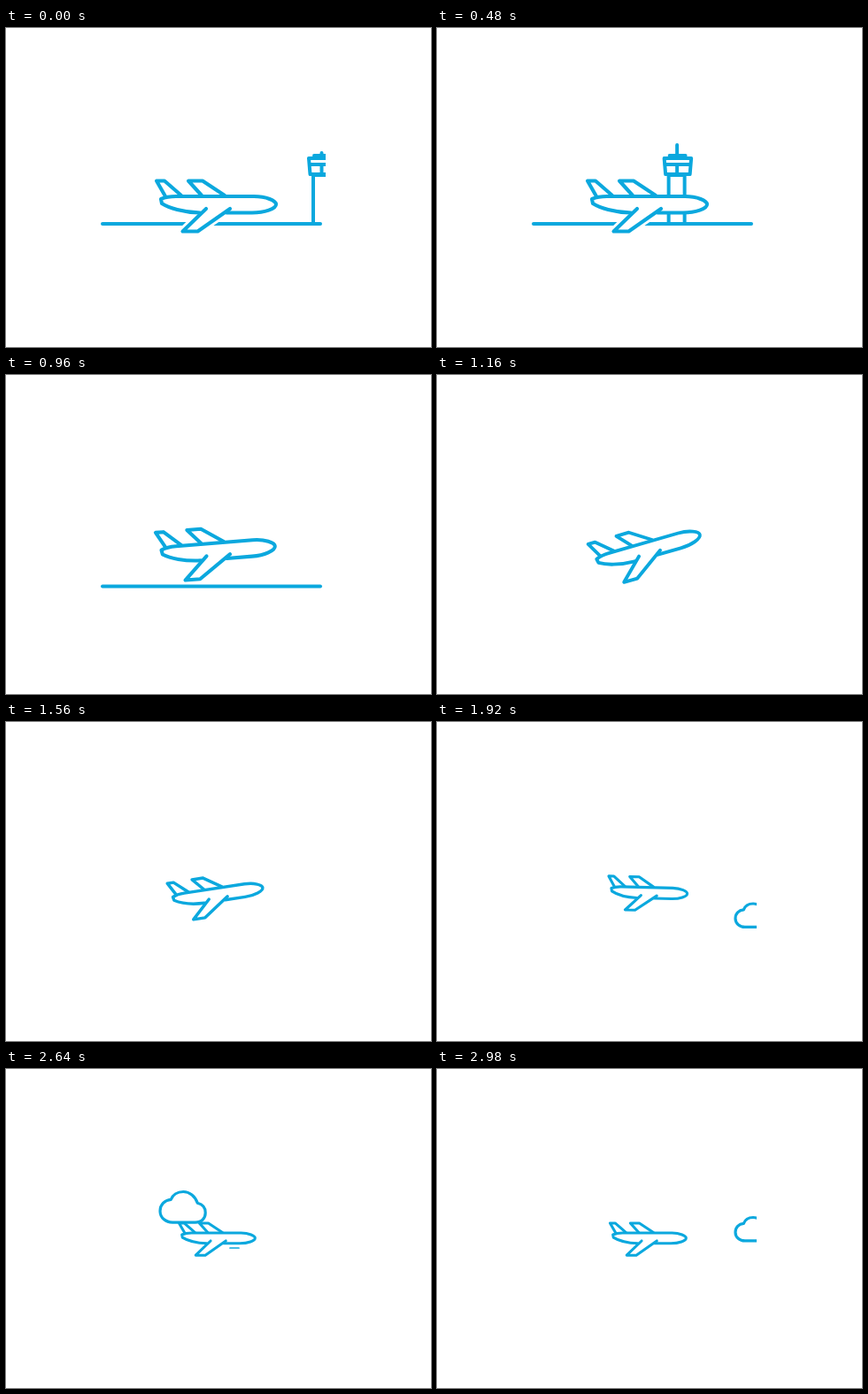
These frames come from a looping animation (480 px wide and 360 px high, 3000 ms). An HTML page:

```html
<!DOCTYPE html>
<html lang="en">
<head>
<meta charset="utf-8">
<title>Take-off</title>
<style>
  html, body { margin: 0; width: 100%; height: 100%; overflow: hidden; background: #fff; }
  svg { display: block; width: 480px; height: 360px; }
  path { vector-effect: non-scaling-stroke; }
  .ink { stroke: #0ba8de; stroke-width: 4; fill: none; stroke-linecap: round; stroke-linejoin: round; }
  .ink .solid { fill: #fff; }
  .ink .halo { stroke: #fff; stroke-width: 10; fill: #fff; }
  .cloud { stroke-width: 3.2; }
  .wind { stroke-width: 1.7; }
</style>
</head>
<body>
<svg viewBox="0 0 480 360">
  <defs>
    <clipPath id="window"><rect x="104" y="120" width="257" height="160"/></clipPath>
    <path id="puff" class="solid" d="M11 27H31C37 27 40 23 40 18.5C40 14 37 11 33 10C31 4 26 0 20.5 0C15 0 11 3 9.5 7C4 7.5 0 11.5 0 17C0 23 5 27 11 27Z"/>
  </defs>
  <g class="ink" clip-path="url(#window)">
    <g id="tower">
      <path class="solid" d="M111 221V166H129V221"/>
      <path class="solid" d="M106 147H136.500L135 165H107.500Z"/>
      <path d="M107 154H135M120.500 154V164M112 144H130"/>
      <path id="mast"/>
    </g>
    <path id="ground" d="M109 221H355"/>
    <g class="cloud">
      <use id="cloud1" href="#puff"/>
      <use id="cloud2" href="#puff"/>
      <use id="cloud3" href="#puff"/>
    </g>
  </g>
  <g id="plane" class="ink">
    <path class="halo" d="M223 207L200 229H217L249 207Z"/>
    <path class="solid" d="M180 190L170 172.500H179L198 189"/>
    <path class="solid" d="M221 189L206 172.500H222L247 189"/>
    <path class="solid" stroke="none" d="M175 193Q182 190 192 190H280C294 190 305 195 305 199C305 204 292 208.500 278 208.500H217C200 208 184 203 176 198Z"/>
    <path d="M219 208.500C200 208 184 203 176 198L175 193Q182 190 192 190H280C294 190 305 195 305 199C305 204 292 208.500 278 208.500H249"/>
    <path class="solid" d="M226 204L199.500 229.500H216.500L253 204"/>
  </g>
  <g class="ink wind">
    <path id="windTop"/>
    <path id="windLow"/>
  </g>
</svg>
<script>
const LOOP = 3000, STEP = 20;
const el = id => document.getElementById(id);

// Each track is a list of [time, value] pairs joined by straight ramps.
function at(track, t) {
  if (t <= track[0][0]) return track[0][1];
  for (let i = 1; i < track.length; i++) {
    const [t0, a] = track[i - 1], [t1, b] = track[i];
    if (t <= t1) return a + (b - a) * (t - t0) / (t1 - t0);
  }
  return track[track.length - 1][1];
}

const tracks = {
  tower: [[310, 236], [780, 0], [880, -50]],
  mast: [[300, 141], [400, 132]],
  ground: [[860, 0], [1100, 42]],
  fade: [[960, 1], [1110, 0]],
  size: [[920, 1], [1160, .92], [1920, .66], [2000, .636]],
  tilt: [[880, 0], [1000, -7], [1160, -16], [1400, -14], [1860, 1.5], [1920, 1.5], [2000, 0]],
  shift: [[920, 240], [1160, 239.3], [1920, 239.7], [2000, 240]],
  rise: [[880, 199], [1160, 196.6], [1920, 192.6], [2000, 190.8]]
};

const clouds = [
  { id: "cloud1", time: 1920, x: 337, y: 205, size: .98, speed: .453 },
  { id: "cloud2", time: 2260, x: 334, y: 138.5, size: 1.28, speed: .421 },
  { id: "cloud3", time: 2980, x: 337, y: 167.5, size: .98, speed: .453 }
];

const place = (id, value) => el(id).setAttribute("transform", value);

// A short streak that slides back while it opens and closes.
function streak(id, t, start, length, from, to, draw) {
  const p = (t - start) / length;
  const live = p > 0 && p < 1;
  el(id).style.display = live ? "" : "none";
  if (live) el(id).setAttribute("d", draw(from + (to - from) * p, 5 * Math.sin(Math.PI * p)));
}

function render(t) {
  const v = {};
  for (const key in tracks) v[key] = at(tracks[key], t);

  place("tower", `translate(${v.tower} 0)`);
  el("mast").setAttribute("d", `M120.5 143V${v.mast}`);
  el("tower").style.display = t < 870 ? "" : "none";

  place("ground", `translate(0 ${v.ground})`);
  el("ground").style.opacity = v.fade;

  place("plane", `translate(${v.shift} ${v.rise}) rotate(${v.tilt}) scale(${v.size}) translate(-240 -199)`);
  el("plane").style.strokeWidth = 1.2 + 2.9 * v.size;

  for (const c of clouds) {
    const x = c.x - (t - c.time) * c.speed;
    place(c.id, `translate(${x} ${c.y}) scale(${c.size})`);
    el(c.id).style.display = x < 366 && x > 40 ? "" : "none";
  }

  streak("windTop", t, 2120, 280, 248, 190,
    (x, r) => `M${x - r - 1} 169H${x + r - 1}M${x - r + 1} 171.3H${x + r + 1}`);
  streak("windLow", t, 2520, 240, 286, 230,
    (x, r) => `M${x - r} 202H${x + r}`);
}

const begin = performance.now();
function frame() {
  const t = (performance.now() - begin) % LOOP;
  render(Math.floor(t / STEP) * STEP);
  requestAnimationFrame(frame);
}
render(0);
requestAnimationFrame(frame);
</script>
</body>
</html>
```
